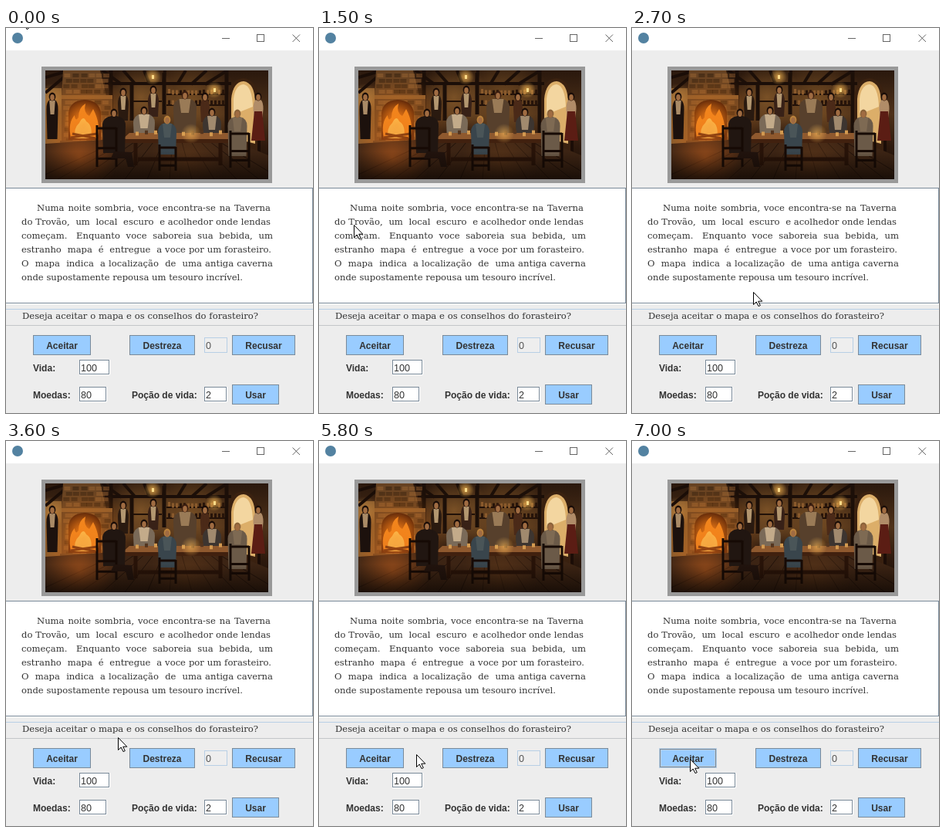
Recreate the animation shown at these times as an HTML page with a canvas. Size 398 by 499 pixels, loop 8 s.

```html
<!DOCTYPE html>
<html lang="pt">
<head>
<meta charset="utf-8">
<style>
  html, body { margin: 0; width: 100%; height: 100%; overflow: hidden; background: #ededed; }
  canvas { display: block; }
</style>
</head>
<body>
<canvas id="stage" width="398" height="499"></canvas>
<script>
const stage = document.getElementById('stage');
const backdrop = document.createElement('canvas');
backdrop.width = 398;
backdrop.height = 499;
let ctx = backdrop.getContext('2d');

const SERIF = '11.6px "DejaVu Serif", serif';
const BOLD = 'bold 12px "Liberation Sans", Arial, sans-serif';
const PLAIN = '12.6px "Liberation Sans", Arial, sans-serif';

function rect(x, y, w, h, fill) {
  ctx.fillStyle = fill;
  ctx.fillRect(x, y, w, h);
}

function frame(x, y, w, h, color) {
  ctx.strokeStyle = color;
  ctx.lineWidth = 1;
  ctx.strokeRect(x + .5, y + .5, w - 1, h - 1);
}

function shape(d, fill) {
  ctx.fillStyle = fill;
  ctx.fill(new Path2D(d));
}

function line(d, color, width = 1) {
  ctx.strokeStyle = color;
  ctx.lineWidth = width;
  ctx.stroke(new Path2D(d));
}

function oval(x, y, rx, ry, fill) {
  ctx.fillStyle = fill;
  ctx.beginPath();
  ctx.ellipse(x, y, rx, ry, 0, 0, 7);
  ctx.fill();
}

function glow(x, y, r, rgb, alpha) {
  const g = ctx.createRadialGradient(x, y, 0, x, y, r);
  g.addColorStop(0, `rgba(${rgb},${alpha})`);
  g.addColorStop(1, `rgba(${rgb},0)`);
  rect(x - r, y - r, 2 * r, 2 * r, g);
}

function text(str, x, y, font, color = '#333') {
  ctx.font = font;
  ctx.fillStyle = color;
  ctx.fillText(str, x, y);
}

// Spreads the spaces so that the line ends at the right margin.
function justified(str, x, right, y) {
  ctx.font = SERIF;
  const spaces = str.split(' ').length - 1;
  ctx.wordSpacing = (right - x - ctx.measureText(str).width) / spaces + 'px';
  text(str, x, y, SERIF);
  ctx.wordSpacing = '0px';
}

function button(label, x, y, w, hover) {
  rect(x, y, w, 26, '#99ccff');
  if (hover) {
    frame(x, y, w, 26, '#b8cfe5');
    frame(x + 2, y + 2, w - 4, 22, '#b8cfe5');
    frame(x + 1, y + 1, w - 2, 24, '#7a8a99');
  } else {
    frame(x, y, w, 26, '#7a8a99');
  }
  ctx.textAlign = 'center';
  text(label, x + w / 2, y + 18, BOLD);
  ctx.textAlign = 'left';
}

function field(value, x, y, w, enabled = true) {
  rect(x, y, w, 20, enabled ? '#fff' : '#eee');
  if (enabled) frame(x, y, w - 1, 19, '#7a8a99');
  else frame(x, y, w, 20, '#b8cfe5');
  text(value, x + 2, y + 15, PLAIN, enabled ? '#333' : '#555');
}

function person(x, top, height, width, coat, shirt = coat, hair = '#1a0d08') {
  const neck = top + 9, foot = top + height, h = width / 2;
  shape(`M${x - 3} ${neck}Q${x - h} ${neck + 2} ${x - h} ${neck + 12}L${x - h + 1} ${foot}H${x + h - 1}` +
        `L${x + h} ${neck + 12}Q${x + h} ${neck + 2} ${x + 3} ${neck}Z`, coat);
  shape(`M${x - h / 2} ${neck + 1}H${x + h / 2}L${x + h / 3} ${neck + 19}H${x - h / 3}Z`, shirt);
  oval(x, top + 5, 4.4, 5.4, hair);
  oval(x, top + 6, 2.8, 4, '#a06c42');
}

function chair(x, y, w, h) {
  line(`M${x} ${y}V${y + h}M${x + w} ${y + 3}V${y + h}M${x} ${y + 4}H${x + w}` +
       `M${x} ${y + h * .55}H${x + w}M${x} ${y + h * .8}H${x + w}`, '#160a05', 3);
}

function painting() {
  let seed = 7;
  const random = () => (seed = seed * 16807 % 2147483647) / 2147483647;

  rect(46, 50, 299, 151, '#999');
  ctx.save();
  ctx.beginPath();
  ctx.rect(51, 55, 289, 141);
  ctx.clip();

  const wall = ctx.createLinearGradient(0, 55, 0, 196);
  wall.addColorStop(0, '#2a180d');
  wall.addColorStop(.4, '#4e3119');
  wall.addColorStop(.7, '#2d190d');
  wall.addColorStop(1, '#180d07');
  rect(51, 55, 289, 141, wall);
  glow(240, 95, 60, '150,100,45', .6);
  glow(175, 90, 45, '160,108,50', .6);

  // Ceiling, posts and shelves
  for (let i = 0; i < 7; i++) line(`M${125 + i * 27} 55L${150 + i * 18} 73`, '#1c0f08', 4);
  line('M128 72H292', '#1b0e08', 4);
  line('M136 55V125M163 73V120M205 58V112M286 55V140', '#1c0f08', 5);
  line('M165 95H202M208 86H284M208 100H284', '#211108', 2);
  for (let x = 210; x < 283; x += 5) {
    rect(x, 79 + random() * 2, 3, 6, random() > .5 ? '#8a5a2c' : '#27140a');
    rect(x, 93 + random() * 2, 3, 6, random() > .5 ? '#8a5a2c' : '#27140a');
  }

  // Left passage and fireplace
  rect(51, 78, 21, 72, '#83592c');
  glow(60, 92, 20, '200,145,75', .6);
  line('M51 64L82 55M51 84L76 63', '#1a0d07', 4);
  shape('M74 55H122L130 88H138V152H72V88Z', '#664222');
  for (let y = 59; y < 150; y += 7) {
    for (let x = 74; x < 134; x += 10) {
      rect(x + random() * 4, y, 8, 5, `rgba(${random() > .5 ? '165,108,55' : '35,20,10'},.4)`);
    }
  }
  rect(72, 87, 66, 5, '#8d5c2c');
  shape('M81 145V110Q83 94 102 93Q121 94 123 110V145Z', '#3a1406');
  glow(101, 120, 27, '255,135,25', 1);
  shape('M84 143Q80 122 89 113Q90 122 94 116Q94 103 103 98Q100 110 108 114L113 105Q124 126 118 143Z', '#f08a20');
  shape('M90 143Q87 130 95 123Q100 112 104 121Q113 126 110 143Z', '#ffd966');
  line('M84 142L118 137M86 137L116 143', '#42190a', 3);
  glow(101, 125, 65, '245,120,20', .45);
  rect(70, 146, 66, 7, '#754820');

  // Arched doorway
  shape('M288 150V93Q289 66 308 65Q327 67 328 96V170Z', '#3a2110');
  shape('M292 142V92Q294 70 308 69Q322 71 323 95V150Z', '#dcae69');
  shape('M295 112V92Q297 74 308 73Q319 75 320 102Z', '#f3d6a0');
  line('M328 90V165', '#1b0d07', 4);

  // Floor
  shape('M51 150L140 144H290L340 165V196H51Z', '#3c2414');
  for (let i = 0; i < 12; i++) line(`M${150 + i * 11} 144L${38 + i * 29} 196`, '#21120a');
  glow(95, 168, 50, '215,105,32', .55);
  glow(235, 171, 50, '120,70,30', .4);

  // Lamps
  for (const [x, y] of [[190, 63], [270, 80]]) {
    glow(x, y, 11, '255,190,85', .75);
    rect(x - 1, y - 2, 3, 5, '#ffdb88');
  }

  // Standing guests
  person(60, 84, 60, 15, '#1c110d', '#a98a66');
  person(152, 78, 42, 14, '#2a1a10', '#b39770');
  person(191, 75, 40, 14, '#382117', '#b39770');
  person(258, 84, 38, 12, '#4b2a18');
  person(327, 84, 32, 13, '#b08c68');
  shape('M322 108H332L336 146H318Z', '#5b1d14');

  // Seated guests around the table
  person(232, 82, 58, 30, '#57402c', '#9a7b57', '#3b1e10');
  person(179, 102, 42, 28, '#7a6a58', '#c3ab8a');
  person(267, 104, 38, 24, '#3d3530', '#a18a6e');
  shape('M160 136H288L296 145H150Z', '#8f592e');
  rect(150, 144, 146, 5, '#41210f');
  line('M168 149V178M278 149V178M171 170H276', '#281308', 5);
  for (let x = 168; x < 280; x += 12) {
    rect(x, 132 + random() * 4, 4, 5, random() > .5 ? '#d39a50' : '#54351f');
  }
  glow(240, 137, 13, '255,190,90', .6);
  person(140, 105, 57, 30, '#211611');
  person(209, 114, 50, 24, '#39454c', '#4a5558', '#b9813c');
  person(300, 106, 60, 25, '#6b5a48', '#7e6a53', '#8b633a');
  chair(118, 126, 25, 54);
  chair(291, 133, 24, 48);
  chair(199, 151, 21, 34);
  shape('M140 160L163 161 166 180H158L155 169H136Z', '#21130d');

  const shade = ctx.createLinearGradient(0, 160, 0, 196);
  shade.addColorStop(0, 'rgba(14,7,3,0)');
  shade.addColorStop(1, 'rgba(14,7,3,.75)');
  rect(51, 160, 289, 36, shade);
  ctx.restore();
}

function drawWindow() {
  rect(0, 0, 398, 499, '#ededed');
  rect(0, 0, 398, 29, '#fff');
  oval(15, 13, 7, 7, '#5382a1');
  line('M280 13.5H290M371.5 8.5L381 18M381 8.5L371.5 18', '#666');
  frame(325, 8, 10, 10, '#666');

  painting();

  // The left edge of the story panel lies just outside the window
  rect(0, 207, 398, 151, '#fff');
  frame(-1, 207, 399, 150, '#7a8a99');
  const story = [
    ['Numa noite sombria, voce encontra-se na Taverna', 40, 343],
    ['do Trovão,  um  local  escuro  e acolhedor onde lendas', 20, 343],
    ['começam.   Enquanto  voce  saboreia  sua  bebida,  um', 20, 346],
    ['estranho  mapa  é  entregue  a voce por um forasteiro.', 20, 344],
    ['O  mapa  indica  a localização  de  uma antiga caverna', 20, 346],
    ['onde supostamente repousa um tesouro incrível.', 20, 307]
  ];
  story.forEach(([str, x, right], i) => justified(str, x, right, 237 + 18 * i));

  rect(0, 364, 398, 1, '#b8cfe5');
  rect(0, 385, 398, 1, '#c3c6c9');
  justified('Deseja aceitar o mapa e os conselhos do forasteiro?', 21, 327, 377);

  button('Destreza', 160, 398, 85);
  button('Recusar', 293, 398, 82);
  button('Usar', 293, 462, 61);
  text('Vida:', 35, 445, BOLD);
  text('Moedas:', 35, 480, BOLD);
  text('Poção de vida:', 163, 480, BOLD);
  field('100', 95, 430, 40);
  field('80', 95, 465, 36);
  field('2', 257, 465, 30);
  field('0', 257, 401, 30, false);
}

// Pointer path: time, x, y
const path = [
  [0, 20, -17], [100, 15, -17], [200, 15, -17], [300, 23, -16], [400, 23, -16],
  [900, 30, 123], [1300, 36, 253], [1400, 36, 253], [2000, 91, 266],
  [2300, 150, 303], [2400, 150, 303], [2700, 157, 342], [2900, 158, 353],
  [3100, 158, 353], [3600, 145, 384], [3700, 145, 384], [4200, 128, 406],
  [5700, 128, 406], [5800, 126, 406], [6600, 84, 404], [7000, 75, 412], [8000, 75, 412]
];

function pointerAt(time) {
  const t = Math.floor(time / 100) * 100;
  const next = path.findIndex(p => p[0] > t);
  const [t0, x0, y0] = path[next - 1], [t1, x1, y1] = path[next];
  const k = (t - t0) / (t1 - t0);
  return [Math.round(x0 + (x1 - x0) * k), Math.round(y0 + (y1 - y0) * k)];
}

function render(now) {
  const [x, y] = pointerAt(now % 8000);
  ctx.drawImage(backdrop, 0, 0);
  button('Aceitar', 35, 398, 75, x >= 35 && x < 110 && y >= 398 && y < 424);
  ctx.save();
  ctx.translate(x, y);
  const arrow = 'M.5 .5V16.5L4.2 13 7 18.6 9.3 17.6 6.7 12.2H11.8Z';
  shape(arrow, '#fff');
  line(arrow, '#000');
  ctx.restore();
  requestAnimationFrame(render);
}

drawWindow();
ctx = stage.getContext('2d');
requestAnimationFrame(render);
</script>
</body>
</html>
```
